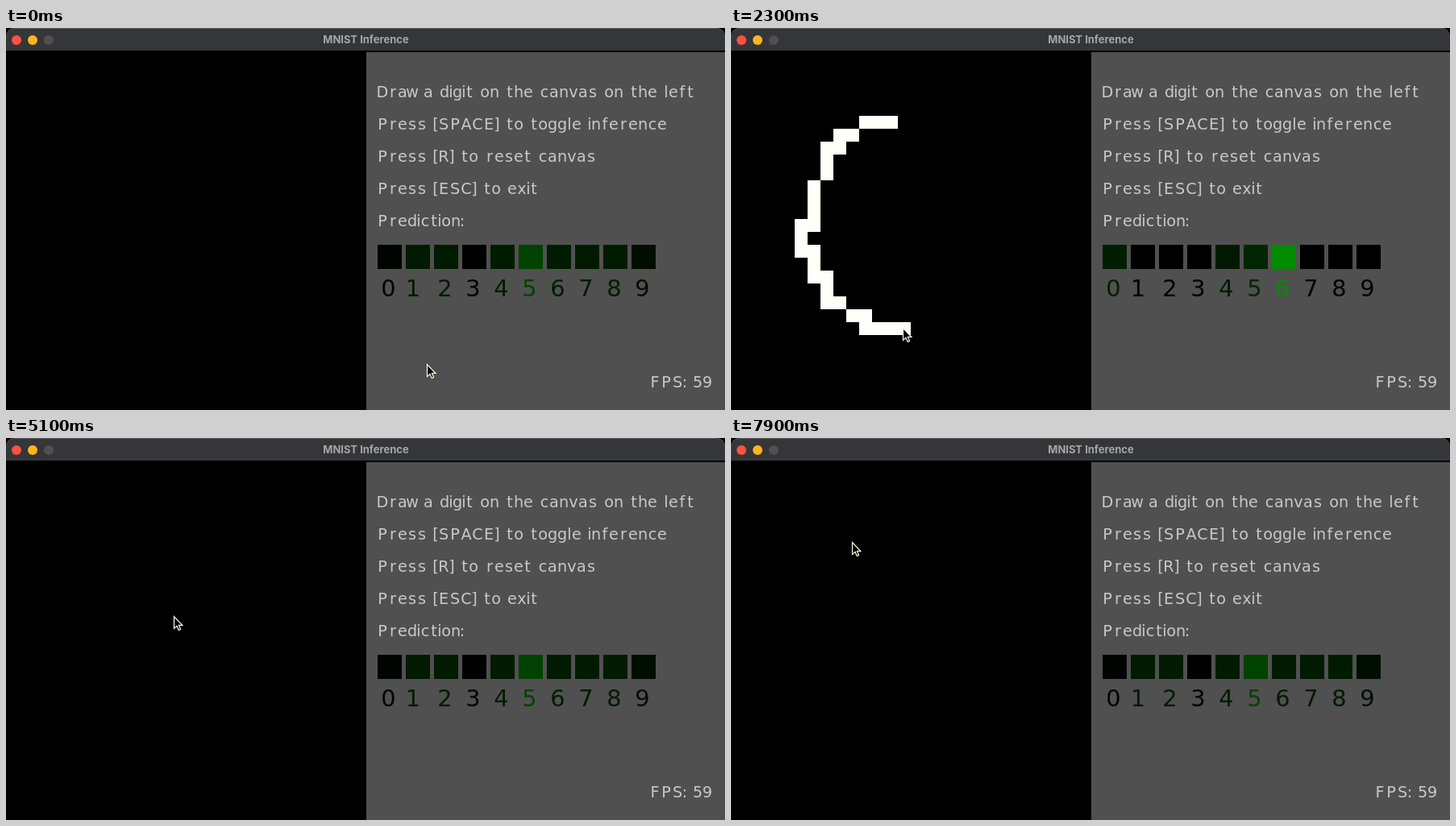
Animation of 892x474 px, one loop 8 s. Source, as an HTML page with a canvas:

```html
<!DOCTYPE html>
<html lang="en">
<head>
<meta charset="utf-8">
<title>MNIST Inference</title>
<style>
  html, body { margin: 0; height: 100%; overflow: hidden; background: #000; }
  canvas { display: block; }
</style>
</head>
<body>
<canvas id="stage" width="892" height="474"></canvas>
<script>
const ctx = document.getElementById('stage').getContext('2d');
const LOOP = 8000, STEP = 100;
const CELL = 16, LEFT = -1, TOP = 29;
const INK_DELAY = 12;
const TEXT = '#c8c8c8';

const lines = [
  'Draw a digit on the canvas on the left',
  'Press [SPACE] to toggle inference',
  'Press [R] to reset canvas',
  'Press [ESC] to exit',
  'Prediction:'
];

const toScreen = ([col, row]) => [LEFT + col * CELL, TOP + row * CELL];

// A pen path in cell units, followed at constant speed.
function stroke(start, end, clear, points) {
  let length = 0;
  const along = points.map((p, i) =>
    length += i ? Math.hypot(p[0] - points[i - 1][0], p[1] - points[i - 1][1]) : 0);
  const keys = points.map((p, i) =>
    [start + (end - start) * along[i] / length, ...toScreen(p)]);
  return { start, end, clear, keys };
}

const zero = stroke(1340, 3290, 4400, [
  [12.9, 5.1], [10, 6], [7.2, 8], [7, 10], [5.5, 14.8], [7, 17.5],
  [8, 19.5], [9, 20], [11, 21.4], [17.3, 21.5], [20, 19.5], [20.5, 16],
  [20, 13.5], [18, 10], [14.5, 7], [12.5, 6.1], [11.2, 5.8]
]);
const one = stroke(5826, 6214, 7100, [[13.4, 6.5], [13.4, 22]]);

// After a stroke the pointer rests until the canvas is cleared.
const rest = ({ clear, keys }) => [clear, ...keys[keys.length - 1].slice(1)];
const pointer = [
  [0, 522, 417], [1300, 205, 111],
  ...zero.keys, rest(zero),
  [5100, 208, 221],
  ...one.keys, rest(one),
  [7900, 150, 129]
];

// Green level per class: a common base with a few exceptions.
const levels = (base, some) =>
  Array.from({ length: 10 }, (_, digit) => some[digit] ?? base);
const idle = levels(27, { 0: 4, 3: 2, 5: 66, 9: 14 });
const likeSix = levels(0, { 0: 30, 4: 26, 5: 38, 6: 140 });
const likeZero = levels(0, { 0: 195, 5: 30, 9: 28 });
const unsure = levels(4, { 0: 12, 1: 42, 3: 24, 5: 60, 7: 40, 9: 50 });
const likeOne = levels(5, { 1: 190 });

const reaction = ({ start, end, clear }, middle, half, full) => [
  [start, ...idle], [middle, ...half], [end, ...full],
  [clear - STEP, ...full], [clear, ...idle]
];
const scores = [
  [0, ...idle],
  ...reaction(zero, 2300, likeSix, likeZero),
  ...reaction(one, 6000, unsure, likeOne)
];

function sample(keys, t) {
  const next = keys.findIndex(k => k[0] > t);
  if (next < 0) return keys[keys.length - 1].slice(1);
  const a = keys[next - 1], b = keys[next];
  const f = (t - a[0]) / (b[0] - a[0]);
  return a.slice(1).map((v, i) => v + (b[i + 1] - v) * f);
}

const glyphWidth = c =>
  'i:'.includes(c) ? 1 : '1l[]'.includes(c) ? 2 : c === ' ' ? 3 :
  'tf'.includes(c) ? 4 : /[A-Z]/.test(c) ? 6 : 5;

// Letters sit on the unit grid of a small bitmap-style face.
function write(text, x, baseline, scale, color) {
  ctx.font = `${9.6 * scale}px "DejaVu Sans", sans-serif`;
  ctx.textAlign = 'center';
  ctx.fillStyle = color;
  for (const c of text) {
    const w = glyphWidth(c) * scale;
    ctx.fillText(c, x + w / 2, baseline);
    x += w + scale;
  }
}

function rect(x, y, w, h, color) {
  ctx.fillStyle = color;
  ctx.fillRect(x, y, w, h);
}

function titleBar() {
  [['#5a5a5a'], ['#343639']].forEach(([color], y) => {
    ctx.fillStyle = color;
    ctx.beginPath();
    ctx.roundRect(0, y, 892, 28 - y, [10, 10, 0, 0]);
    ctx.fill();
  });
  ['#ff5040', '#ffb420', '#505050'].forEach((color, i) => {
    ctx.fillStyle = color;
    ctx.beginPath();
    ctx.arc(13 + 20 * i, 15, 6, 0, Math.PI * 2);
    ctx.fill();
  });
  ctx.font = 'bold 13px Inter, sans-serif';
  ctx.textAlign = 'center';
  ctx.fillStyle = '#a6a6a6';
  ctx.fillText('MNIST Inference', 446.5, 19);
}

function panel(t) {
  rect(447, 30, 445, 444, '#505050');
  lines.forEach((line, i) => write(line, 461, 86 + 40 * i, 2, TEXT));
  sample(scores, t).forEach((level, i) => {
    const color = `rgb(0 ${Math.round(level)} 0)`;
    rect(461 + 35 * i, 269, 30, 30, color);
    write(String(i), 467 + 35 * i, 333, 3, color);
  });
  write('FPS: 59', 799, 446, 2, TEXT);
}

function drawing(t) {
  for (const { start, end, clear, keys } of [zero, one]) {
    if (t >= clear) continue;
    for (let u = start; u <= Math.min(t - INK_DELAY, end); u += 2) {
      const [x, y] = sample(keys, u);
      const cell = [Math.floor((x - LEFT) / CELL), Math.floor((y - TOP) / CELL)];
      rect(...toScreen(cell), CELL, CELL, '#fffffa');
    }
  }
}

const arrow = new Path2D('M.5 .5V15.5L4 12.3 6.3 17.5 8.6 16.5 6.4 11.3H10.8Z');
function cursor(t) {
  const [x, y] = sample(pointer, t);
  ctx.save();
  ctx.translate(Math.round(x), Math.round(y));
  ctx.fillStyle = '#000';
  ctx.strokeStyle = '#ffffe0';
  ctx.lineWidth = 1.2;
  ctx.fill(arrow);
  ctx.stroke(arrow);
  ctx.restore();
}

function frame(now) {
  const t = Math.floor(now % LOOP / STEP) * STEP;
  rect(0, 0, 892, 474, '#000');
  titleBar();
  panel(t);
  drawing(t);
  cursor(t);
  requestAnimationFrame(frame);
}
requestAnimationFrame(frame);
</script>
</body>
</html>
```
